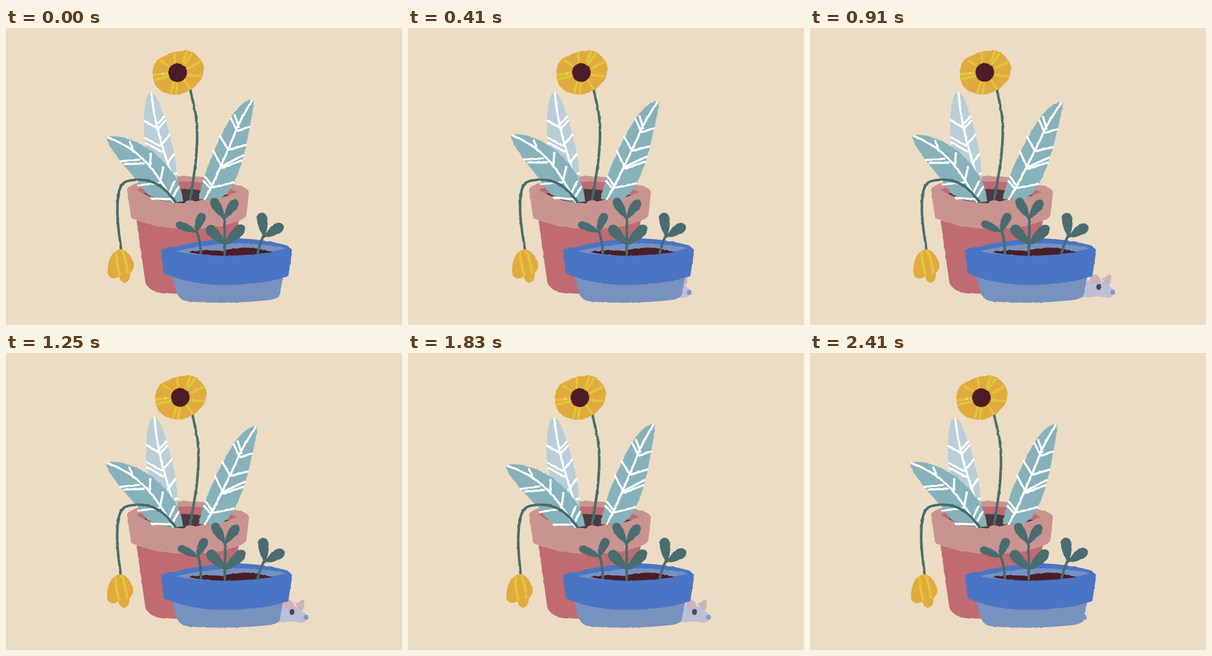
Write an HTML page that moves like this. It is 864x648 px and loops after 2.5 s.

```html
<!DOCTYPE html>
<html lang="en">
<head>
<meta charset="utf-8">
<title>Potted plants</title>
<style>
html, body { margin: 0; height: 100%; overflow: hidden; background: #ecdcc3; }
svg { display: block; width: 100vw; height: 100vh; }
.rough { filter: url(#rough); }
.line { fill: none; stroke-linecap: round; stroke-linejoin: round; }
.vein { stroke: #fff; stroke-width: 4.6; }
.stem { stroke: #486c6f; stroke-width: 5.6; }
.ray { stroke: #e0c739; stroke-width: 5; stroke-linecap: butt; }
.teal { fill: #87b2bb; }
.green { fill: #486c6f; }
.gold { fill: #e1aa3e; }
.red { fill: #bf6b71; }
.rim { fill: #c99490; }
.blue { fill: #4a75c4; }
.pale { fill: #7792bf; }
.soil { fill: #4a1d27; }
</style>
</head>
<body>
<svg viewBox="0 0 864 648">
  <filter id="rough" x="-15%" y="-15%" width="130%" height="130%" color-interpolation-filters="sRGB">
    <feTurbulence type="fractalNoise" baseFrequency=".11" numOctaves="1" seed="4"/>
    <feDisplacementMap in="SourceGraphic" scale="3.4" xChannelSelector="R" yChannelSelector="G"/>
  </filter>

  <g class="rough">
    <path class="red" d="M284 415L304 555Q312 576 345 579L390 580L480 560L509 415Z"/>
    <path class="rim" d="M264 352Q270 341 300 335Q345 323 400 323Q460 325 500 342Q527 347 530 358L524 413C500 428 440 440 400 439C350 438 300 428 273 414Z"/>
    <path class="red" d="M285 353Q320 335 400 335Q468 337 504 358Q470 372 430 374Q400 384 365 381Q310 370 285 353Z"/>
    <path fill="#4b3a3e" d="M301 361Q390 340 486 365Q470 372 430 374Q400 384 365 381Q320 374 301 361Z"/>
  </g>

  <g id="midLeaf" class="rough">
    <path fill="#b9ced8" d="M316 141C328 142 338 170 347 200C362 245 374 290 374 350L362 350C330 320 303 275 302 235C299 200 302 140 316 141Z"/>
    <path class="line vein" d="M317 143Q324 200 336 240Q350 290 370 345M302 203L329 218M345 194L328 213M347 203L331 220M304 240L337 258M305 251L340 270M357 233L338 256M367 275L348 300M372 317L361 322"/>
  </g>

  <g id="leftLeaf" class="rough">
    <path class="teal" d="M220 238C250 230 300 250 335 283C365 312 385 345 386 378L365 381C340 376 310 370 302 356C290 335 265 310 245 285C230 262 219 250 220 238Z"/>
    <path class="line vein" d="M223 239Q285 262 322 312Q340 336 365 379M270 248L278 270M316 274L314 303M343 304L336 338M250 291L291 287M259 297L302 296M289 343L338 338M368 334L356 360M377 347L364 368M318 372L362 374"/>
  </g>

  <g id="flower" class="rough">
    <path class="line stem" d="M402 374C408 330 417 290 417 235C418 190 408 165 402 134"/>
    <path class="gold" d="M321 90C323 76 331 66 342 63C352 59 358 55 366 53C380 48 404 48 413 56C422 66 430 74 432 86C432 99 428 112 421 118C412 126 408 134 396 138C384 148 362 147 350 142C336 138 327 130 324 120C320 110 320 100 321 90Z"/>
    <path class="line ray" d="M367 55L369 77M395 51L386 76M406 55L390 79M425 73L397 88M427 105L396 102M402 134L388 112M374 119L371 145M367 117L359 143M321 103L354 99M324 113L356 105M336 71L360 86"/>
    <path class="line" stroke="#f1e3ae" stroke-width="1.6" d="M342 97L343 101"/>
    <circle class="soil" cx="374.5" cy="97.5" r="20.3"/>
  </g>

  <g id="rightLeaf" class="rough">
    <path class="teal" d="M541 157C525 153 505 172 490 197C465 238 432 310 420 374L465 372C490 362 500 335 511 303C525 260 536 200 541 157Z"/>
    <path class="line vein" d="M537 158Q510 200 497 236Q470 300 450 342Q442 360 434 373M499 190L508 216M491 197L503 223M531 215L502 226M467 236L484 264M523 255L486 266M452 267L469 300M517 278L468 303M514 289L472 305M434 324L450 345M431 334L446 350M496 337L450 348"/>
  </g>
  <ellipse class="rim" cx="402" cy="380" rx="11" ry="4"/>

  <g class="rough"><path class="line stem" d="M369 379C345 345 320 330 288 331Q262 332 256 339"/></g>
  <g id="bud" class="rough">
    <path class="line stem" d="M256 339C244 350 243 375 243 405C244 440 249 460 251 484"/>
    <path class="gold" d="M250 483C265 483 280 505 279 521C277 531 272 532 271 536C271 550 266 555 259 555C251 555 248 548 247 542C240 548 222 549 222 532C221 510 230 486 250 483Z"/>
    <path class="line ray" d="M240 488Q241 515 249 541M252 485Q264 508 265 536"/>
  </g>

  <g id="mouse" class="rough">
    <path fill="#bbbfd8" d="M570 586L635 587Q650 592 656 581L655 572Q645 556 625 551Q600 548 570 560Z"/>
    <path fill="#cfb1bd" d="M609 539C617 533 624 542 627 546C632 553 622 560 615 558C606 560 600 546 609 539ZM632 545C639 547 643 537 648 538C653 545 650 556 646 562C640 558 632 553 632 545Z"/>
    <ellipse cx="624" cy="565" rx="5.4" ry="6.6" fill="#55485a"/>
    <circle cx="655" cy="576.5" r="5.5" fill="#8097c5"/>
  </g>

  <g class="rough">
    <path class="pale" d="M363 543L374 582Q380 594 400 597Q485 603 570 594Q594 592 598 580L604 543Z"/>
    <path class="blue" d="M338 485Q350 478 372 476Q430 461 510 459Q565 461 612 474L625 484L616 541Q560 561 470 561Q395 558 344 535Z"/>
    <path class="pale" d="M371 487Q440 470 510 470Q580 472 610 481Q560 494 480 497Q400 495 371 487Z"/>
    <path class="soil" d="M398 489Q420 483 470 486Q520 476 545 481Q575 486 582 489Q530 496 480 497Q430 496 398 489Z"/>
  </g>

  <g id="sproutA" class="rough"><path class="line stem" d="M425 491Q424 465 416 443"/></g>
  <g id="sproutB" class="rough"><path class="line stem" d="M477 495Q478 455 476 412"/></g>
  <g id="sproutC" class="rough"><path class="line stem" d="M549 491Q554 470 562 453"/></g>
</svg>
<script>
const LOOP = 2500, FRAMES = 30;
const el = id => document.getElementById(id);

// Teardrop leaf from its pointed base to its round end.
function addLeaf(id, x, y, endX, endY, half) {
  const len = Math.hypot(endX - x, endY - y), w = half / .64;
  const angle = Math.atan2(endY - y, endX - x) * 180 / Math.PI;
  const path = document.createElementNS("http://www.w3.org/2000/svg", "path");
  path.setAttribute("class", "green");
  path.setAttribute("d", `M0 0C${len * .3} ${-w * .55} ${len} ${-w * 1.1} ${len} 0C${len} ${w * 1.1} ${len * .3} ${w * .55} 0 0Z`);
  path.setAttribute("transform", `translate(${x} ${y}) rotate(${angle})`);
  el(id).append(path);
}
addLeaf("sproutA", 419, 446, 371, 427, 9);
addLeaf("sproutA", 413, 447, 430, 404, 10);
addLeaf("sproutB", 477, 418, 450, 372, 10.5);
addLeaf("sproutB", 475, 418, 503, 375, 10.5);
addLeaf("sproutB", 480, 474, 439, 433, 12);
addLeaf("sproutB", 476, 474, 519, 432, 12);
addLeaf("sproutC", 564, 458, 557, 403, 11.5);
addLeaf("sproutC", 562, 457, 604, 430, 11.5);

// id, pivot x, pivot y, swing in degrees, time of the peak
const sways = [
  ["midLeaf", 365, 376, .93, 1060],
  ["leftLeaf", 372, 380, 2.4, 580],
  ["flower", 402, 375, .82, 950],
  ["rightLeaf", 430, 375, 1.94, 850],
  ["bud", 256, 339, -1.97, 580],
  ["sproutA", 425, 492, 1.95, 1380],
  ["sproutB", 477, 497, .73, 1000],
  ["sproutC", 549, 492, 1.06, 1300]
];

// time and nose position of the mouse
const peek = [
  [0, 575], [160, 575], [250, 583], [330, 597], [410, 614], [500, 631], [580, 644.5],
  [660, 653], [750, 659], [830, 661.5], [910, 661], [1000, 660], [1160, 657], [1250, 655],
  [1830, 656], [2000, 656], [2080, 655], [2160, 650], [2250, 638], [2330, 621], [2410, 599], [2500, 575]
];

function noseAt(t) {
  const i = peek.findIndex(k => k[0] > t);
  const [t0, x0] = peek[i - 1], [t1, x1] = peek[i];
  return x0 + (x1 - x0) * (t - t0) / (t1 - t0);
}

function draw(t) {
  const wave = peak => Math.cos((t - peak) / LOOP * 2 * Math.PI) - Math.cos(peak / LOOP * 2 * Math.PI);
  for (const [id, x, y, swing, peak] of sways)
    el(id).setAttribute("transform", `rotate(${swing * wave(peak)} ${x} ${y})`);
  el("mouse").setAttribute("transform", `translate(${noseAt(t) - 655} 0)`);
}

// Twelve pictures a second, starting on whole hundredths.
const startOf = i => Math.floor(i * LOOP / FRAMES / 10) * 10;
let shown = -1;
const begin = performance.now();
function tick() {
  const t = Math.max(0, performance.now() - begin) % LOOP;
  let i = Math.floor(t * FRAMES / LOOP);
  if (i + 1 < FRAMES && startOf(i + 1) <= t) i++;
  if (i !== shown) draw(startOf(shown = i));
  requestAnimationFrame(tick);
}
tick();
</script>
</body>
</html>
```
